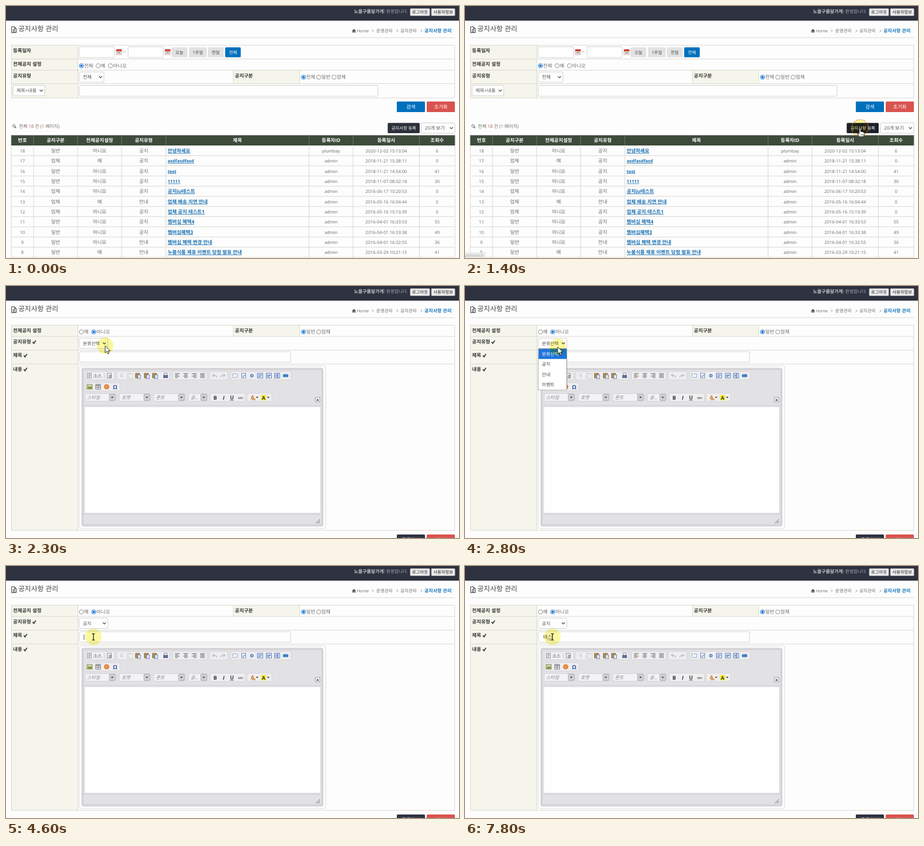
Recreate the animation shown at these times as an HTML page. Size 772 px wide and 430 px high, loop 8000 ms.

```html
<!DOCTYPE html>
<html lang="ko">
<head>
<meta charset="utf-8">
<title>공지사항 관리</title>
<style>
  html, body { margin: 0; height: 100%; overflow: hidden; background: #fdfdfd; }
  svg { display: block; width: 772px; height: 430px; }
  text { font-family: "Open Sans", "Noto Sans CJK KR", sans-serif; text-rendering: geometricPrecision; white-space: pre; }
  .b { font-weight: 700; }
  .m { text-anchor: middle; }
  .i { font-style: italic; }
  #halo { mix-blend-mode: multiply; }
</style>
</head>
<body>
<svg id="stage" viewBox="0 0 772 430"></svg>
<script>
const BLUE = '#0070bd', RED = '#d9534f', DARK = '#2f3340', LINE = '#d6d5cf', GREY = '#6b6b6b';

// Drawing helpers, each returning SVG markup
const text = (x, y, s, size = 8.4, fill = GREY, cls = '', extra = '') =>
  `<text x="${x}" y="${y}" font-size="${size}" fill="${fill}" class="${cls}" ${extra}>${s}</text>`;
const rect = (x, y, x2, y2, fill, stroke = 'none', r = 0) =>
  `<rect x="${x}" y="${y}" width="${x2 - x}" height="${y2 - y}" rx="${r}" fill="${fill}" stroke="${stroke}" stroke-width=".8"/>`;
const path = (d, stroke, w = 1, fill = 'none') =>
  `<path d="${d}" fill="${fill}" stroke="${stroke}" stroke-width="${w}"/>`;
const circle = (x, y, r, fill, stroke = 'none') =>
  `<circle cx="${x}" cy="${y}" r="${r}" fill="${fill}" stroke="${stroke}" stroke-width=".9"/>`;
const group = (id, body) => `<g id="${id}">${body}</g>`;

const hline = y => path(`M9 ${y}H765`, LINE, .9);
const label = (x, y, s) => text(x, y, s, 8.4, '#333', 'b');
const input = (x, y, x2, y2) => rect(x, y, x2, y2, '#fefefe', '#c8c8c8', 2);
const button = (x, y, x2, y2, s, bg, fg = '#fff', size = 8.4) =>
  rect(x, y, x2, y2, bg, 'none', 1.5) + text((x + x2) / 2, (y + y2) / 2 + 3, s, size, fg, 'm');
const select = (x, y, x2, y2, s, size = 8.2, id = '') =>
  input(x, y, x2, y2) + text(x + 6, (y + y2) / 2 + 3, s, size, '#555', '', id && `id="${id}"`) +
  path(`M${x2 - 8.5} ${(y + y2) / 2 - 1.3}l2.6 2.6 2.6 -2.6`, '#333', 1.1);
const radio = (x, y, s, on) =>
  circle(x, y, 3.6, '#fff', on ? '#0b6fd0' : '#888') + (on ? circle(x, y, 2.1, '#0b6fd0') : '') + text(x + 4.5, y + 2.7, s);
const check = (x, y) => path(`M${x - 2.6} ${y}l2 2.4 3.4 -5`, '#222', 1.5);
const calendar = x => rect(x, 74, x + 9, 83, '#f4ece8', '#b9a9a4') + rect(x, 74, x + 9, 77.5, '#cf4032') +
  path(`M${x + 2} 80h5`, '#777', 1.4);

function header() {
  return rect(0, 0, 772, 25, DARK) +
    text(593, 12, '노을구름달가게', 7.9, '#c6c8ce', 'b') + text(644, 12, '! 환영합니다.', 7.6, '#a9acb4') +
    rect(689, 4.5, 722, 16.5, '#ececec', '#bbb', 1) + text(705.5, 13.3, '로그아웃', 7.3, '#222', 'm') +
    rect(725, 4.5, 765, 16.5, '#ececec', '#bbb', 1) + text(745, 13.3, '사용자정보', 7.3, '#222', 'm') +
    path('M9.5 35.5h5l3 3v7h-8zM14.5 35.5v3h3M11.3 40h4.5M11.3 42h4.5M11.3 44h4.5', '#444') +
    text(21, 43, '공지사항 관리', 11.8, '#444') + hline(54) +
    path('M589.5 42.5l3.5-3.5 3.5 3.5h-1v3h-2v-2h-1v2h-2v-3z', 'none', 0, '#555') +
    text(598, 45, 'Home', 7.2) + text(631, 45, '운영관리', 7.6) + text(672, 45, '공지관리', 7.6) +
    text(713, 45, '공지사항 관리', 8, '#1a79bd', 'b') +
    [624, 666, 707].map(x => path(`M${x} 40.3l2 2-2 2`, '#777', .9)).join('');
}

// Bordered form table with tinted label cells
function formTable(rows, pairRow) {
  const [top, bottom] = [rows[0], rows.at(-1)], [y, y2] = pairRow;
  return rect(9, top, 122, bottom, '#f5f5ec') + rect(387.5, y, 500.5, y2, '#f5f5ec') +
    rows.map(hline).join('') + path(`M9.4 ${top}V${bottom}M764.6 ${top}V${bottom}M122.5 ${top}V${bottom}` +
    `M387.5 ${y}V${y2}M500.5 ${y}V${y2}`, LINE, .9) + label(390, y + 12, '공지구분');
}

const notices = `일반|아니요|공지|안녕하세요|plumbay|2020-12-02 15:13:04|6
업체|예|공지|asdfasdfasd|admin|2018-11-21 15:38:11|0
일반|아니요|공지|test|admin|2018-11-21 14:54:00|41
일반|아니요|공지|11111|admin|2018-11-07 08:32:18|30
업체|아니요|공지|공지ju테스트|admin|2016-06-17 10:20:53|0
업체|예|안내|업체 배송 지연 안내|admin|2016-05-16 16:04:44|0
업체|아니요|공지|업체 공지 테스트1|admin|2016-05-16 15:13:39|0
일반|아니요|공지|멤버십 혜택4|admin|2016-04-01 16:33:53|55
일반|아니요|공지|멤버십혜택3|admin|2016-04-01 16:33:38|49
일반|아니요|안내|멤버십 혜택 변경 안내|admin|2016-04-01 16:32:55|36
일반|예|안내|누봄식품 제휴 이벤트 당첨 발표 안내|admin|2016-03-29 10:21:15|41`.split('\n');

function noticeTable() {
  const cols = [9, 47, 122, 197, 272.5, 516.5, 591.5, 704.5, 765], rowH = 17.35, top = 238;
  const mid = i => (cols[i] + cols[i + 1]) / 2;
  let out = rect(9, 220.5, 765, top, '#3d4b3b');
  '번호 공지구분 전체공지설정 공지유형 제목 등록자ID 등록일시 조회수'.split(' ')
    .forEach((s, i) => out += text(mid(i), 232.4, s, 8.3, '#fff', 'b m'));
  cols.forEach(x => out += path(`M${x} 220.5V${top}`, '#76806f', .8) + path(`M${x} ${top}V430`, LINE, .9));
  notices.forEach((row, r) => {
    const y = top + rowH * r + 11.8;
    [18 - r, ...row.split('|')].forEach((s, i) => {
      const size = /[가-힣]/.test(s) ? 8.4 : 7.5;
      out += i == 4 ? text(275.5, y, s, size, '#1a70b0', 'b', 'text-decoration="underline"')
                    : text(mid(i), y, s, size, GREY, 'm');
    });
    out += hline(top + rowH * (r + 1));
  });
  return out;
}

function listPage() {
  return formTable([67, 90.5, 109.5, 132.5, 157], [109.5, 132.5]) +
    label(12, 79, '등록일자') + label(12, 102.3, '전체공지 설정') + label(12, 121.5, '공지유형') +
    input(125, 69.5, 185, 88) + calendar(188) + text(199.5, 81, '~', 8) + input(208, 69.5, 268, 88) + calendar(271) +
    button(282, 70.5, 309, 87.5, '오늘', '#e2e2e2', '#444', 7.4) + button(312, 70.5, 342, 87.5, '1주일', '#e2e2e2', '#444', 7.4) +
    button(344, 70.5, 371, 87.5, '한달', '#e2e2e2', '#444', 7.4) + button(373.5, 70.5, 400, 87.5, '전체', BLUE, '#fff', 7.4) +
    radio(128.5, 102, '전체', 1) + radio(157, 102, '예') + radio(178, 102, '아니오') +
    select(125, 112.5, 167, 130, '전체') +
    radio(507, 121.5, '전체', 1) + radio(533, 121.5, '일반') + radio(559, 121.5, '업체') +
    select(12, 135.5, 66, 153, '제목+내용', 8) + input(125, 135.5, 634, 154) +
    button(666, 163, 714, 181, '검색', BLUE) + button(717, 163, 765, 181, '초기화', RED) +
    circle(13.6, 204.6, 2.1, 'none', '#555') + path('M15.2 206.2l2 2', '#555', 1.3) +
    text(22, 208, '전체 <tspan fill="#c0604c">18</tspan> 건 (<tspan fill="#c0604c">1</tspan> 페이지)', 7.8) +
    rect(650.5, 199.5, 705, 217, '#2b303b', 'none', 1.5).replace('<rect', '<rect id="register"') +
    text(678, 211, '공지사항 등록', 7.3, '#fff', 'm') + select(708, 199.5, 765, 217, '20개 보기', 8.1) +
    noticeTable() +
    group('status', '<g opacity=".85">' + rect(0, 420, 35, 430, '#e9e9e9') + '</g>' + text(0, 428, 'ateNotice', 7, '#aaa'));
}

function toolbar() {
  const box = (x, x2, y) => rect(x, y - 7, x2, y + 7, '#efeef0', '#d2d0d4', 2);
  const sheet = (x, fill, stroke, y = 153) => rect(x - 3.5, y - 4, x + 3.5, y + 4, fill, stroke);
  const lines = (x, indents) => path(indents.map((d, i) => `M${x - 4 + d[0]} ${149.5 + i * 2.2}h${d[1]}`).join(''), '#666', 1);
  const L = [[0, 8], [0, 5]], C = [[0, 8], [1.5, 5]], R = [[0, 8], [3, 5]], J = [[0, 8], [0, 8]];
  let out = [[135, 185], [189, 279], [284, 343], [347, 378], [383, 486]].map(([a, b]) => box(a, b, 153)).join('') +
    box(135, 194, 172) + box(348, 408, 190) + box(411, 453, 190);
  out += sheet(142, '#fafafa', '#777') + path('M140 151h4M140 153h4M140 155h3', '#668', .8) +
    path('M167.5 148.5v9', '#bbb', .8) + sheet(176, '#fafafa', '#777') + circle(177.5, 154, 2, '#dde', '#555') +
    path('M194 149l5 7M200 149l-5 7', '#c3c3c8') + sheet(210, '#eee', '#ccc') + sheet(213, '#eee', '#ccc', 154);
  [225, 240, 254].forEach(x => out += sheet(x - .8, '#b08a50', '#8a6b3c') + rect(x - .5, 151.5, x + 4.5, 158, '#dfe8f8', '#5874a8'));
  out += rect(268, 152, 276, 157, '#5d7093') + rect(269.5, 148.5, 274.5, 152, '#f4f4f8', '#7887a4');
  [L, C, R, J].forEach((p, i) => out += lines(292 + i * 14.3, [...p, ...p]));
  out += path('M359 156q0-4-7-3.5m2.5-2.5l-2.5 2.5 2.5 2.5M366 156q0-4 7-3.5m-2.5-2.5l2.5 2.5-2.5 2.5', '#b9b9bd', 1.3) +
    '<g stroke-dasharray="2 1">' + rect(386.5, 150, 394.5, 156, '#f5f7ff', '#4a6fae') + '</g>' +
    sheet(405, '#f6f9ff', '#4a6fae') + path('M403 153l1.5 2 3-4', '#357', 1) + circle(419, 153, 2.6, '#8fb0e4', '#4a6fae');
  [433, 448, 462].forEach((x, i) => out += rect(x - 4.5, 149, x + 4.5, 157, '#e4ecfb', '#3c62a6') +
    path(i < 2 ? `M${x - 3} 152.${i * 3}h6M${x - 3} 154.5h4` : `M${x + 1} 149v8M${x - 3} 152h3M${x - 3} 154h3`, '#3c62a6', 1.2));
  out += rect(472, 150.5, 481, 155.5, '#3f7fc5', 'none', 1) +
    rect(138, 168, 147, 176, '#c8d6a0', '#6b7a55') + path('M138.5 175l3-4 2 2 2-2 1.5 4z', 'none', 0, '#7d8a33') +
    rect(153, 168, 161, 176, '#fafafa', '#555') + path('M153 169.5h8M153 172.5h8M157 170v6', '#667', 1) +
    circle(171.5, 172, 4, '#ee9148', '#c9712b') + text(186, 175.6, 'Ω', 9.5, '#2b50a0', 'b m');
  [[135, 187], [193, 246], [252, 305], [311, 343]].forEach(([a, b]) => out += rect(a, 183.5, b, 196.5, '#f3f2f4', '#cfcdd1', 2) +
    rect(b - 11, 184.5, b - 1, 195.5, '#cfced1', '#aaa', 1) + path(`M${b - 8} 189h4l-2 2.6z`, 'none', 0, '#333'));
  return out + text(356.5, 193.6, 'B', 9, '#333', 'b m') + text(371, 193.6, 'I', 9, '#333', 'b i m') +
    text(385, 193.3, 'U', 8.6, '#333', 'b m', 'text-decoration="underline"') +
    text(400, 192.6, 'abc', 5.6, '#555', 'm', 'text-decoration="line-through"') +
    text(420, 193, 'A', 9, '#d07a2c', 'b m') + rect(419, 192, 425, 195, '#e4a26a') + path('M426 189h4l-2 2.4z', 'none', 0, '#333') +
    rect(434.5, 186, 443.5, 195, '#f4e838') + text(439, 193.6, 'A', 8.5, '#333', 'b m') + path('M445 189h4l-2 2.4z', 'none', 0, '#333') +
    rect(527, 190, 535, 198, '#e9e8ea', '#999') + path('M529 195.5h4l-2-2.6z', 'none', 0, '#222') +
    path('M528 405l7-7M531 405l4-4M533.5 405l1.5-1.5', '#777', 1);
}

function editor() {
  return rect(125, 136, 545, 414, '#fdfdfd', '#d3d3d3', 4) + rect(128.5, 139.5, 541, 410.5, '#d8d6da', 'none', 4) +
    rect(131.5, 142.5, 538.5, 407.5, '#e2e1e4', '#c9c7cb') + path('M132 204H538M132 389.5H538', '#cdcbcf', .9) +
    rect(134, 206, 536, 387.5, '#fefefe', '#d6d4d8') +
    group('bare', path('M135 197.5h54V186M193 197.5h54V186M252 197.5h55V186M311 197.5h33V186M167 149v8M263 149v8', '#d3d1d5', .9) +
      rect(527.5, 190.5, 535, 197.5, '#e6e5e8', '#aaa')) + group('tools', toolbar()) +
    text(149, 155.8, '소스', 7.6, '#555') +
    [[138, '스타일'], [197, '포맷'], [255.5, '폰트'], [314.5, '글...']].map(([x, s]) => text(x, 192.6, s, 8, '#888', 'i')).join('');
}

const options = ['분류선택', '공지', '안내', '이벤트'], OPTION_H = 17.4;

function formPage() {
  return formTable([67, 86, 109.5, 133, 417], [67, 86]) +
    label(12, 79, '전체공지 설정') + label(12, 98, '공지유형') + label(12, 121.3, '제목') + label(12, 145, '내용') +
    check(48, 95.5) + check(33, 118.5) + check(33, 142.3) +
    radio(128.5, 78.3, '예') + radio(149.5, 78.3, '아니오', 1) + radio(507, 78.3, '일반', 1) + radio(533, 78.3, '업체') +
    select(125, 89, 173.5, 106.5, '', 7.8, 'kind') + input(125, 112, 485, 130) +
    text(133, 124, '', 8.4, '#555', '', 'id="typed"') +
    group('compose', path('M0 126h7.6', '#555', .8)) + group('caret', path('M133 116.5v9.5', '#333', .8)) +
    editor() + button(666, 424, 714, 442, '등록하기', DARK) + button(717, 424, 765, 442, '취소', RED) +
    group('menu', rect(125, 107, 173.5, 177, '#fff', '#777') +
      options.map((s, i) => group('option' + i, rect(125.5, 107.3 + i * OPTION_H, 173, 107.3 + (i + 1) * OPTION_H, '#fff') +
        text(131, 119 + i * OPTION_H, s, 7.8, '#444'))).join(''));
}

const pointer = group('halo', circle(0, 0, 14, '#fbf9a0')) +
  group('arrow', path('M0 0V12L2.8 9.4 4.8 13.8 6.7 13 4.8 8.7H8.6Z', '#222', .9, '#fff')) +
  group('hand', path('M-1.2 0.8q1.2-1.6 2.4 0V6l5 1.2q1.4.6 1.2 2.3L6.4 15H-1L-4.6 9.5q.8-1.6 3.4.6z', '#222', 1, '#fff') +
    path('M2 10v3M4.3 10v3', '#222', .7)) +
  group('ibeam', path('M-2.3-5.5Q0-5.5 0-4.5 0-5.5 2.3-5.5M0-5V5M-2.3 5.5Q0 5.5 0 4.5 0 5.5 2.3 5.5', '#222', 1.3));

stage.innerHTML = header() + group('list', listPage()) + group('form', formPage()) +
  '<circle id="ring" fill="none" stroke="#e8743c" stroke-width="2" stroke-dasharray="3 1.5"/>' + group('pointer', pointer);

const $ = id => document.getElementById(id);
const show = (id, on) => $(id).style.display = on ? '' : 'none';
const lastBefore = (list, t) => list.findLast(item => item[0] <= t);

// [time, x, y]
const route = [[100, 26, 90], [900, 655, 219], [1200, 673, 208], [1450, 673, 208], [1600, 647, 203], [1800, 456, 150],
  [2100, 230, 88], [2300, 169, 102], [2450, 160, 101], [2800, 158, 104], [3200, 147, 133], [3400, 151, 121], [3800, 149, 121], [8000, 149, 121]];
const clicks = [[1300, 673, 208], [2450, 160, 101], [3250, 147, 133], [3800, 149, 121]];
const typing = [[0, ''], [5000, 'ㅌ'], [5100, '테'], [5200, '텟'], [5400, '테스'], [5500, '테스트'], [6000, '테스ㅌ'], [6500, '테스'],
  [6600, '테'], [7100, ''], [7200, 'ㅌ'], [7400, '테'], [7500, '텟'], [7700, '테스']];

function position(t) {
  const i = Math.max(1, route.findIndex(p => p[0] > t));
  const [a, b] = [route[i - 1], route[i]], k = (t - a[0]) / (b[0] - a[0]);
  return [a[1] + (b[1] - a[1]) * k, a[2] + (b[2] - a[2]) * k];
}

function draw(t) {
  const [x, y] = position(t), onForm = t >= 1500, hover = t >= 1000 && !onForm;
  show('list', !onForm);
  show('form', onForm);
  show('status', hover);
  $('register').setAttribute('fill', hover ? '#1d2128' : '#2b303b');
  show('bare', t < 1700);
  show('tools', t >= 1700);

  const open = t >= 2500 && t < 3300;
  show('menu', open);
  options.forEach((_, i) => {
    const on = i == Math.max(0, Math.floor((y - 107.3) / OPTION_H));
    $('option' + i).firstChild.setAttribute('fill', on ? '#1e74d8' : '#fff');
    $('option' + i).lastChild.setAttribute('fill', on ? '#fff' : '#444');
  });
  $('kind').textContent = options[t < 3300 ? 0 : 1];

  const word = lastBefore(typing, t)[1];
  $('typed').textContent = word;
  show('compose', word && !(t >= 6500 && t < 7100));
  $('compose').setAttribute('transform', `translate(${133 + (word.length - 1) * 7.73})`);
  show('caret', !word && t >= 3800 && (t < 4100 || t >= 4600));

  show('pointer', t >= 100);
  $('pointer').setAttribute('transform', `translate(${x} ${y})`);
  const ibeam = t >= 3400;
  show('hand', hover);
  show('ibeam', ibeam);
  show('arrow', !hover && !ibeam);

  const click = lastBefore(clicks, t), p = click ? (t - click[0]) / 350 : 1;
  show('ring', p < 1);
  if (p < 1) {
    const attrs = { cx: click[1], cy: click[2], r: 10 + 14 * p, opacity: (1 - p) ** 2 };
    for (const name in attrs) $('ring').setAttribute(name, attrs[name]);
  }
}

function tick() {
  draw(Math.floor(performance.now() % 8000 / 100) * 100);
  requestAnimationFrame(tick);
}
tick();
</script>
</body>
</html>
```
